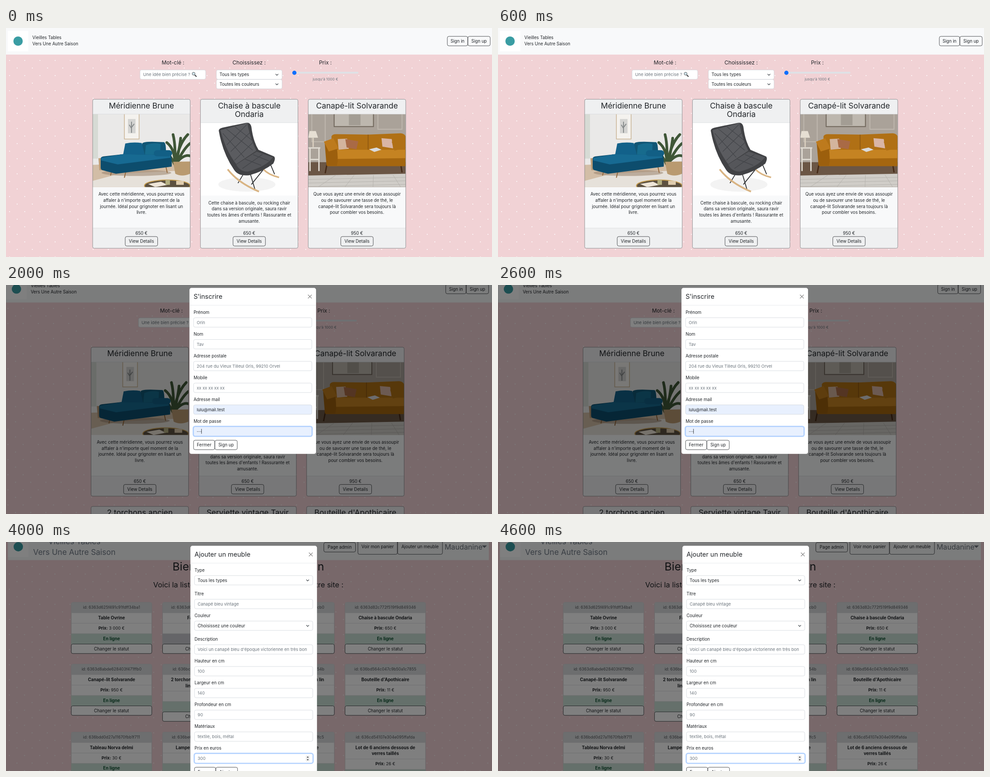
An HTML page for the animation above (5 s loop, 1088 by 515 pixels).

```html
<!DOCTYPE html>
<html lang="fr">
<head>
<meta charset="utf-8">
<title>Boutique de meubles</title>
<style>
  html, body { margin: 0; width: 100%; height: 100%; overflow: hidden; }
  svg { display: block; }
  #stage { width: 1088px; height: 515px; font-family: Inter, "Open Sans", sans-serif; }
</style>
</head>
<body>
<svg id="stage" viewBox="0 0 1088 515"></svg>
<script>
const INK = '#212529', MUTED = '#6c757d', PALE = '#f8f9fa';
const BRAND = ['Vieilles Tables', 'Vers Une Autre Saison'];
const SCENE_MS = 1000;

// Drawing helpers: y of a text is its vertical centre.
const rect = (x, y, w, h, fill, more = '') =>
  `<rect x="${x}" y="${y}" width="${w}" height="${h}" fill="${fill}" ${more}/>`;
const path = (d, fill, more = '') => `<path d="${d}" fill="${fill}" ${more}/>`;
const line = (d, color, width = 1, more = '') =>
  path(d, 'none', `stroke="${color}" stroke-width="${width}" ${more}`);
const circle = (x, y, r, fill) => `<circle cx="${x}" cy="${y}" r="${r}" fill="${fill}"/>`;
const ellipse = (x, y, rx, ry, fill, more = '') =>
  `<ellipse cx="${x}" cy="${y}" rx="${rx}" ry="${ry}" fill="${fill}" ${more}/>`;
const text = (x, y, str, size = 9.7, fill = INK, more = '') =>
  `<text x="${x}" y="${y + size * .36}" font-size="${size}" fill="${fill}" ${more}>${str}</text>`;
const label = (x, y, str, size, fill, more = '') =>
  text(x, y, str, size, fill, 'text-anchor="middle" ' + more);
const bold = (x, y, str, fill) => label(x, y, str, 9.7, fill, 'font-weight="700"');
const lines = (x, y, list, step, size) =>
  list.map((str, i) => label(x, y + i * step, str, size)).join('');
const shift = (x, y, content) => `<g transform="translate(${x} ${y})">${content}</g>`;
const box = (x, y, w, h, stroke, fill = '#fff') =>
  rect(x, y, w, h, fill, `rx="3.5" stroke="${stroke}" stroke-width=".8"`);
const button = (x, y, w, str, h = 21.3, fill = 'none') =>
  box(x, y, w, h, INK, fill) + label(x + w / 2, y + h / 2, str);
const chevron = (x, y) => line(`M${x - 3} ${y - 1.5}l3 3l3 -3`, '#343a40', 1.2);
const select = (x, y, w, str) =>
  box(x, y, w, 21, '#ced4da') + text(x + 7, y + 10.5, str) + chevron(x + w - 11.5, y + 10.5);
const logo = (x, y) => rect(x, y, 46, 46, '#fff') + circle(x + 23, y + 23, 10.5, '#3a9da3');
const background = rect(-20, -20, 1150, 640, '#f1d2d5') + rect(-20, -20, 1150, 640, 'url(#dots)');
const backdrop = rect(0, 0, 1088, 515, '#000', 'opacity=".5"');

const daybed =
  rect(0, 0, 218, 164, '#eae9e8') +
  path('M0 114L218 106V164H0Z', '#d2bda6') +
  path('M0 150L60 134L218 126V164H0Z', '#e6e1da') +
  rect(0, 0, 12, 100, '#d6dad4') + path('M13 99H29L27 126H15Z', '#b99a74') +
  rect(71, -2, 33, 58, '#f4f2ee', 'stroke="#c8b393" stroke-width="1.5"') +
  rect(79, 11, 17, 32, '#d4d4d2') + line('M87 42V17M87 32l-5 -8M87 30l6 -8', '#85898a', 2) +
  ellipse(98, 132, 78, 7, '#a08a75', 'opacity=".6"') +
  line('M74 130l-3 13M42 130l-2 8M164 118l3 14', '#94683c', 2) +
  line('M184 112Q184 78 166 64M184 112Q186 70 180 46M185 112Q193 66 213 46M187 112Q204 77 218 66M183 112Q171 86 157 82M187 110Q205 89 218 94M186 112Q195 76 197 54', '#3f5637', 6, 'stroke-linecap="round"') +
  path('M180 107H218V134Q200 142 185 134Z', '#b99a70') +
  path('M111 66Q113 62 133 62L160 63Q165 66 164 94H108Z', '#115675') +
  path('M68 92L73 66Q92 62 110 65L117 93Z', '#12618a') +
  path('M117 92L119 70Q136 63 152 67L151 90Z', '#176b8d') +
  path('M18 100Q18 96 24 95L68 90L174 92Q178 94 177 118L52 134L22 126Q18 125 18 120Z', '#0d4d6d') +
  path('M19 98L68 90L174 92V98L56 113L19 104Z', '#176a92') +
  rect(137, 81, 41, 14, '#125f85', 'rx="7"') +
  ellipse(167, 161, 51, 13, '#5d5140', 'stroke="#c59c4e" stroke-width="2"') +
  path('M124 157L153 152L168 159L140 164Z', '#eee5d7') +
  rect(163, 148, 10, 11, '#b5b082') + rect(187, 150, 17, 9, '#dfccae');

const rocker =
  rect(0, 0, 218, 164, '#fff') + ellipse(104, 139, 64, 16, '#f3f3f3') +
  line('M96 116L84 136M112 116L122 150M156 92L166 116M150 94L114 139', '#2d2f31', 1.8) +
  line('M61 105Q84 135 131 155', '#d9b483', 4) + line('M140 104Q153 118 176 123', '#d9b483', 3.6) +
  path('M41 18Q41 13 50 11L104 0Q112 0 114 9Q118 42 130 61L165 76Q169 80 163 92Q140 110 110 118Q86 121 76 107Q50 70 41 18Z', '#414245') +
  path('M45 17L105 1Q112 38 125 63L80 93Q56 62 45 17Z', '#5b5c60') +
  path('M80 94L126 65L162 78Q148 98 106 110Q88 110 80 94Z', '#55565a') +
  line('M58 14L117 62M77 9L120 43M50 24L98 78M104 4L59 50M112 21L68 65M119 43L76 85M100 82L136 96M118 72L153 86M139 71L94 103', '#414347', 1.2);

const sofa =
  rect(0, 0, 218, 164, '#aaa299') +
  line('M8 0V62H38V0M156 0V34H210V0', '#bfb8ae', 2) +
  rect(58, -3, 88, 31, '#bdb7ae', 'stroke="#6f655a" stroke-width="2"') + rect(91, 0, 26, 25, '#a39d94') +
  path('M0 108H218V164H0Z', '#6b5645') +
  path('M0 138L218 134V164H0Z', '#d0cdc8') +
  line('M0 147L218 142M0 155L218 150M0 163L218 158M22 164L62 137M82 164L103 137M145 164L146 137M207 164L190 137', '#b3b0ab', .9) +
  path('M3 38H17L22 53H0Z', '#e6dfd3') + line('M11 53V74', '#d8cdbd', 3) +
  line('M0 76H27M4 76V128M24 76V128M4 102H24', '#e0dbd2', 3) +
  line('M42 112L38 133M207 112L210 131', '#452a17', 3) +
  path('M52 50Q54 45 62 45L134 46L207 43Q216 44 218 50V91H53Z', '#b07015') +
  path('M61 80H218V117H43L41 103Z', '#a5660f') + path('M61 80H218V99L43 101Z', '#c58322') +
  line('M134 46V80', '#8a5511', 1.5) +
  path('M37 66Q43 58 58 62Q66 66 66 106L64 116H41Z', '#9c5f0d') +
  path('M35 62L56 54L68 77L46 84Z', '#bd7a1d') + path('M66 56L87 55L91 78L68 80Z', '#d3b49d') +
  path('M83 56L112 61L108 79L86 75Z', '#a96a46') + path('M164 54L187 56L190 77L166 73Z', '#d9b5a5') +
  path('M187 62L214 55L218 76L193 82Z', '#b07015') + path('M136 79L153 75L164 80L148 85Z', '#d9dadc');

const SHOP_X = [194, 435.3, 676.6];
const CARDS = [
  { title: ['Méridienne Brune'], price: 650, photo: daybed, body: ['Avec cette méridienne, vous pourrez vous',
    "affaler à n'importe quel moment de la", 'journée. Idéal pour grignoter en lisant un', 'livre.'] },
  { title: ['Chaise à bascule', 'Ondaria'], price: 650, photo: rocker, body: ['Cette chaise à bascule, ou rocking chair',
    'dans sa version originale, saura ravir', "toutes les âmes d'enfants ! Rassurante et", 'amusante.'] },
  { title: ['Canapé-lit Solvarande'], price: 950, photo: sofa, body: ['Que vous ayez une envie de vous assoupir',
    'ou de savourer une tasse de thé, le', 'canapé-lit Solvarande sera toujours là', 'pour combler vos besoins.'] },
];
const NEXT_TITLES = ['2 torchons ancien', 'Serviette vintage Tavir', "Bouteille d'Apothicaire"];

function shopCard(card, i) {
  const x = SHOP_X[i], mid = x + 109.2;
  const top = 193.7 + (card.title.length - 1) * 19.2;
  return rect(x, 160.3, 218.3, 335, PALE, 'rx="3.5"') +
    rect(x, 160.3, 218.3, top - 160.3, '#eff0f1', 'rx="3.5"') +
    rect(x, 450, 218.3, 45.3, '#eff0f1', 'rx="3.5"') +
    `<svg x="${x}" y="${top}" width="218.3" height="164">${card.photo}</svg>` +
    line(`M${x} ${top}h218.3M${x} 450h218.3`, '#d3d5d7', .7) +
    box(x, 160.3, 218.3, 335, '#777b7e', 'none') +
    lines(mid, 174.5, card.title, 19.4, 17.4) +
    lines(mid, top + 180.2, card.body, 13.65, 9.7) +
    label(mid, 461.5, card.price + ' €') + button(mid - 36.3, 469, 72.6, 'View Details');
}

const shop = background +
  rect(-10, -10, 1120, 69.8, PALE) + logo(4, 6.5) +
  text(59, 22, BRAND[0]) + text(59, 35.8, BRAND[1]) +
  button(988, 18.8, 45.6, 'Sign in') + button(1034, 18.8, 50, 'Sign up') +
  label(373.8, 78, 'Mot-clé :', 12) + label(544.3, 78, 'Choississez :', 12) + label(715, 78, 'Prix :', 12) +
  box(300, 94.3, 147, 21, '#ced4da') + text(307, 104.8, 'Une idée bien précise ?', 9.5, MUTED) +
  line('M422.5 105.5l4 4', '#34383b', 2) +
  '<circle cx="420" cy="102.8" r="3.3" fill="#cfe3ea" stroke="#55595c"/>' +
  select(471, 94.3, 147, 'Tous les types') + select(471, 115.8, 147, 'Toutes les couleurs') +
  rect(641, 98.5, 148, 4, '#dee2e6', 'rx="2"') + circle(645.6, 100.7, 4.7, '#0d6efd') +
  label(715, 115.5, "jusqu'à 1000 €", 8.2, MUTED) +
  CARDS.map(shopCard).join('') +
  NEXT_TITLES.map((title, i) =>
    box(SHOP_X[i], 518.4, 218.3, 60, '#777b7e', '#eff0f1') +
    label(SHOP_X[i] + 109.2, 532.5, title, 17.4)).join('');

const ITEMS = [
  ['6363d625f491c91fdff34ba1', ['Table Ovrine'], '3 000'],
  ['6363d649a7982955a2b0db73', ['Fauteuil Tordal'], '450', true],
  ['6363d7a9ad0a217e0a1b5cb0', ['Méridienne Brune'], '650'],
  ['6363d82c772f519f9d849346', ['Chaise à bascule Ondaria'], '650'],
  ['6363d8abde628403f471ffb0', ['Canapé-lit Solvarande'], '950'],
  ['636bcbfd226dde51ecb2f825', ['2 torchons ancien Veloudie en', 'lin à liteau rouge'], '16'],
  ['636bcdcaf74302d1cd15654b', ['Serviette vintage Tavir en lin'], '8'],
  ['636bd564c047c9b50a1c7855', ["Bouteille d'Apothicaire"], '11'],
  ['636bdd0d27a11670fbb1f711', ['Tableau Norva delmi'], '30'],
  ['636be69b5ac5a54c981ac2dd', ['Lampe baladeuse vintage'], '70'],
  ['636be97a3f62eb2a0bc51fc5', ['Lampe Torvelin vintage'], '75'],
  ['636cd54107e304e095ffafda', ['Lot de 6 anciens dessous de', 'verres taillés'], '26'],
];

function adminCard([id, title, price, sold], i) {
  const x = 146.6 + (i % 4) * 204.3, y = [136.6, 275.6, 428.4][i >> 2];
  const w = 180.3, mid = x + w / 2, extra = (title.length - 1) * 13.5;
  return box(x, y, w, 115 + extra, '#c5c5c8') +
    rect(x, y, w, 23.4, '#dcdddf', 'rx="3"') +
    rect(x, y + 70.3 + extra, w, 23.4, sold ? '#cbccd1' : '#cce2d7') +
    line(`M${x} ${y + 23.4}h${w}M${x} ${y + 47 + extra}h${w}M${x} ${y + 70.3 + extra}h${w}`, '#d5d6d8', .7) +
    label(mid, y + 11.5, 'id: ' + id, 8.9, '#55595d') +
    title.map((str, n) => bold(mid, y + 34.8 + n * 13.5, str)).join('') +
    label(mid, y + 58 + extra, `<tspan font-weight="700">Prix:</tspan> ${price} €`, 9.4) +
    bold(mid, y + 81.3 + extra, sold ? 'Vendu' : 'En ligne', sold ? '#141619' : '#0f5132') +
    button(x, y + 93.7 + extra, w, 'Changer le statut', 21.3, '#fff');
}

const admin = background +
  rect(5, -10, 1076.5, 51.5, PALE) + logo(5, -11.5) +
  label(153.5, 0, BRAND[0], 17.4, '#707b87') + label(153.5, 24, BRAND[1], 17.4, '#707b87') +
  button(712, 2, 71, 'Page admin') +
  button(788.3, -6, 88.3, 'Voir mon panier', 34.5) + button(877.3, -6, 100.3, 'Ajouter un meuble', 34.5) +
  text(982.5, 11.8, 'Maudanine', 16.2, MUTED) + path('M1066 8.5h11l-5.5 5.5z', MUTED) +
  label(543, 55.5, 'Bienvenue sur la page admin', 24.9) +
  label(543, 96.5, 'Voici la liste des <tspan text-decoration="underline">25 meubles</tspan> renseignés sur votre site :', 16.5) +
  ITEMS.map(adminCard).join('');

// Dialog with stacked fields; each field is { name, hint } plus optional state.
function modal(x, y, title, fields, action, actionWidth) {
  const w = 283.4, inner = 264.8, left = 9.2;
  let top = 66.6, content = '';
  for (const { name, hint, value, list, focus, autofill, spinner, caret } of fields) {
    content += text(left, top - 12, name);
    if (list) {
      content += select(left, top, inner, list);
      top += 4.2;
    } else {
      if (focus) content += rect(left - 1, top - 1, inner + 2, 23, 'none', 'rx="4.5" stroke="#c2dbfe" stroke-width="2.4"');
      content += box(left, top, inner, 21.2, focus ? '#86b7fe' : '#ced4da', autofill ? '#e8f0fe' : '#fff') +
        text(left + 7, top + 10.6, value || hint, 9.5, value ? INK : MUTED);
      if (caret) content += line(`M${left + 17.8} ${top + 5}v11`, INK, .9);
      if (spinner) content += rect(left + 249, top + 4, 9, 13.5, '#eee', 'rx="1"') +
        path(`M${left + 251.3} ${top + 9}h4.4l-2.2 -3zM${left + 251.3} ${top + 12.5}h4.4l-2.2 3z`, '#44484b');
    }
    top += 49;
  }
  const foot = top - 18.5;
  return backdrop + shift(x, y,
    rect(0, -.4, w, foot + 31, '#fff', 'rx="4.5"') +
    text(left, 19, title, 14.5) +
    line('M265.3 14.8l8.4 8.4m0 -8.4l-8.4 8.4', '#777', 1.1) +
    line(`M0 38.5h${w}`, '#dee2e6', .7) + content +
    button(left, foot, 47.3, 'Fermer') + button(left + 47.8, foot, actionWidth, action));
}

const signIn = modal(411.5, 11, 'Se connecter', [
  { name: 'Adresse mail', hint: 'votre@boite.test' },
  { name: 'Mot de passe', hint: 'motdepasse' },
], 'Se connecter', 74.5);

const signUp = modal(410.7, 7, "S'inscrire", [
  { name: 'Prénom', hint: 'Orin' },
  { name: 'Nom', hint: 'Tav' },
  { name: 'Adresse postale', hint: '204 rue du Vieux Tilleul Gris, 99210 Orvel' },
  { name: 'Mobile', hint: 'xx xx xx xx xx' },
  { name: 'Adresse mail', value: 'lulu@mail.test', autofill: true },
  { name: 'Mot de passe', value: '····', autofill: true, focus: true, caret: true },
], 'Sign up', 50);

const addItem = modal(412.8, 9, 'Ajouter un meuble', [
  { name: 'Type', list: 'Tous les types' },
  { name: 'Titre', hint: 'Canapé bleu vintage' },
  { name: 'Couleur', list: 'Choisissez une couleur' },
  { name: 'Description', hint: "Voici un canapé bleu d'époque victorienne en très bon" },
  { name: 'Hauteur en cm', hint: '100' },
  { name: 'Largeur en cm', hint: '140' },
  { name: 'Profondeur en cm', hint: '90' },
  { name: 'Matériaux', hint: 'textile, bois, métal' },
  { name: 'Prix en euros', hint: '300', focus: true, spinner: true },
], 'Ajouter', 48.5);

const scenes = [
  shop,
  shift(-2.6, -17, shop) + signIn,
  shift(-3.6, -20.4, shop) + signUp,
  admin,
  shift(-.5, -.8, admin) + addItem,
];

const stage = document.getElementById('stage');
stage.innerHTML = `<defs><pattern id="dots" width="34" height="34" patternUnits="userSpaceOnUse">
  ${circle(8, 5, 1.1, '#fff')}${circle(25, 22, 1.1, '#fff')}</pattern></defs>` +
  scenes.map(content => `<g class="scene">${content}</g>`).join('');
const groups = [...stage.querySelectorAll('.scene')];

const start = performance.now();
function render(now) {
  const current = Math.floor(Math.max(0, now - start) / SCENE_MS) % groups.length;
  groups.forEach((group, i) => { group.style.display = i === current ? '' : 'none'; });
  requestAnimationFrame(render);
}
render(start);
</script>
</body>
</html>
```
